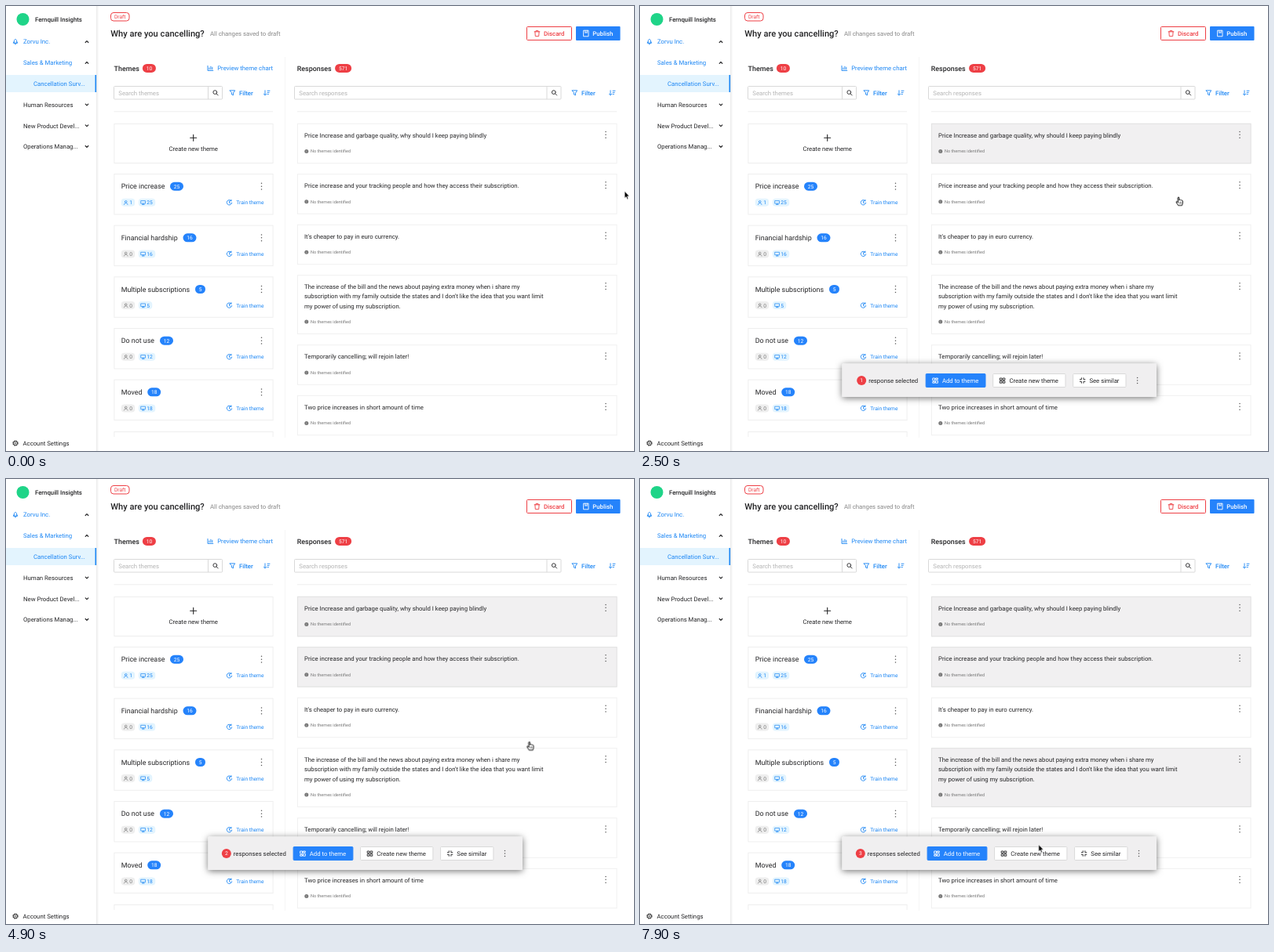
An HTML page that plays this animation: 800x568 px, repeating every 8 s.

```html
<!DOCTYPE html>
<html lang="en">
<head>
<meta charset="utf-8">
<title>Survey responses</title>
<style>
html, body { margin: 0; width: 100%; height: 100%; overflow: hidden; background: #fff; }
svg { display: block; width: 800px; height: 568px; font-family: Roboto, sans-serif; text-rendering: geometricPrecision; }
.anim { animation: 8s linear infinite; }
#cursor { animation-name: travel; }
#arrow { animation-name: arrow; animation-timing-function: step-end; }
#hand { animation-name: hand; animation-timing-function: step-end; }
#hover0 { animation-name: hover0; }
#hover1 { animation-name: hover1; }
#hover3 { animation-name: hover3; }
#picked0 { animation-name: picked0; }
#picked1 { animation-name: picked1; }
#picked3 { animation-name: picked3; }
#popup { animation-name: popup; animation-timing-function: step-end; }
#single { animation-name: single; animation-timing-function: step-end; }
#plural { animation-name: plural; animation-timing-function: step-end; }
#two { animation-name: two; animation-timing-function: step-end; }
#three { animation-name: three; animation-timing-function: step-end; }
@keyframes travel {
  0%, 1.25% { transform: translate(788px, 236.5px); animation-timing-function: ease-in-out; }
  12.5%, 21.25% { transform: translate(661.7px, 188.5px); animation-timing-function: ease-in-out; }
  26.25%, 56.25% { transform: translate(686px, 243.7px); animation-timing-function: ease-in-out; }
  65%, 92.5% { transform: translate(655px, 390.5px); animation-timing-function: ease-in-out; }
  98.7%, 100% { transform: translate(507.7px, 466.7px); }
}
@keyframes arrow { 0% { opacity: 1 } 4% { opacity: 0 } 96.8%, 100% { opacity: 1 } }
@keyframes hand { 0% { opacity: 0 } 4% { opacity: 1 } 96.8%, 100% { opacity: 0 } }
@keyframes hover0 { 0%, 7.5% { opacity: 0 } 11%, 20% { opacity: 1 } 22.5%, 100% { opacity: 0 } }
@keyframes hover1 { 0%, 48.75% { opacity: 0 } 52%, 55% { opacity: 1 } 58.75%, 100% { opacity: 0 } }
@keyframes hover3 { 0%, 62% { opacity: 0 } 65%, 85% { opacity: 1 } 88.75%, 100% { opacity: 0 } }
@keyframes picked0 { 0%, 20% { opacity: 0 } 22.5%, 100% { opacity: 1 } }
@keyframes picked1 { 0%, 55% { opacity: 0 } 58.75%, 100% { opacity: 1 } }
@keyframes picked3 { 0%, 85% { opacity: 0 } 88.75%, 100% { opacity: 1 } }
@keyframes popup { 0% { opacity: 0 } 31.2%, 100% { opacity: 1 } }
@keyframes single { 0% { opacity: 1 } 56.2%, 100% { opacity: 0 } }
@keyframes plural { 0% { opacity: 0 } 56.2%, 100% { opacity: 1 } }
@keyframes two { 0% { opacity: 1 } 92.4%, 100% { opacity: 0 } }
@keyframes three { 0% { opacity: 0 } 92.4%, 100% { opacity: 1 } }
</style>
</head>
<body>
<svg id="stage" viewBox="0 0 800 568">
  <defs>
    <filter id="shadow" x="-10%" y="-60%" width="120%" height="220%">
      <feDropShadow dx="0" dy="1.5" stdDeviation="4" flood-color="#000" flood-opacity=".55"/>
    </filter>
    <clipPath id="list"><rect x="130" y="140" width="220" height="410"/></clipPath>
  </defs>
</svg>
<script>
const INK = '#242426', BLUE = '#1b86f4', FILL = '#2583fb', RED = '#ee3f45', MUTED = '#868686', PALE = '#e3f4fe';
const BODY = 7.78, SMALL = 6.67, TINY = 5.56, TITLE = 8.89;

// Text is placed by the vertical centre of its capitals.
const text = (x, cy, str, { size = BODY, fill = INK, weight = 400, anchor = 'start' } = {}) =>
  `<text x="${x}" y="${cy + size * 0.36}" font-size="${size}" fill="${fill}" font-weight="${weight}" text-anchor="${anchor}">${str}</text>`;
const rect = (x, y, w, h, fill = 'none', stroke = 'none', r = 0) =>
  `<rect x="${x}" y="${y}" width="${w}" height="${h}" rx="${r}" fill="${fill}" stroke="${stroke}"/>`;
const line = (d, stroke, width = 1) =>
  `<path d="${d}" fill="none" stroke="${stroke}" stroke-width="${width}"/>`;
const icon = (x, y, d, color, width = 0.9, fill = 'none') =>
  `<path transform="translate(${x} ${y})" d="${d}" fill="${fill}" stroke="${color}" stroke-width="${width}" stroke-linejoin="round" stroke-linecap="round"/>`;
const anim = (id, content) => `<g id="${id}" class="anim">${content}</g>`;
const dots = (x, y, gap = 3.9) =>
  [-gap, 0, gap].map(d => `<circle cx="${x}" cy="${y + d}" r=".75" fill="#555"/>`).join('');
const pill = (cx, cy, w, str, fill) =>
  rect(cx - w / 2, cy - 5.5, w, 11, fill, 'none', 5.5) +
  text(cx, cy, str, { size: SMALL, fill: '#fff', anchor: 'middle' });

const ICON = {
  chart: 'M-3.3-3V3H3.5M-1.4 1.4V-.5M.6 1.4V-2.2M2.5 1.4V-1.2',
  funnel: 'M-3.2-3H3.2L1 .2V3L-1 2.2V.2Z',
  sort: 'M-2-3V3M-3.6 1.4L-2 3L-.4 1.4M1-2.6H4M1-.4H3.2M1 1.8H2.4',
  search: 'M1.7-.7A2.4 2.4 0 1 1-3.1-.7A2.4 2.4 0 1 1 1.7-.7M1.1 1.1L3.2 3.2',
  trash: 'M-3.4-2.2H3.4M-1.3-2.2V-3.6H1.3V-2.2M-2.6-2.2L-2.2 3.6H2.2L2.6-2.2',
  sheet: 'M-3-3.8H3V3.8H-3ZM-1.2-3.6V-.6L0-1.4L1.2-.6V-3.6',
  clock: 'M2.4-2.2A3.2 3.2 0 1 0 3.2.4M0-1.7V.3L1.5 1.1M2.5-3.4V-2H1.1',
  person: 'M-1.3-1A1.3 1.3 0 1 1 1.3-1A1.3 1.3 0 1 1-1.3-1M-2.3 2.6C-2 0 2 0 2.3 2.6',
  screen: 'M-2.7-2.2H2.7V1.3H-2.7ZM0 1.3V2.5M-1.4 2.6H1.4',
  drop: 'M-1.7 1.2V-1C-1.7-2.5-.6-3.5 0-3.9C.6-3.5 1.7-2.5 1.7-1V1.2ZM-1.7-.6L-2.9 1.2H2.9L1.7-.6M-.7 2.8H.7',
  grid: 'M-3-3H-.6V-.6H-3ZM.8-3H3.2V-.6H.8ZM-3 .8H-.6V3.2H-3ZM.8.8H3.2V3.2H.8Z',
  addGrid: 'M-3-3H-.6V0H-3ZM.8-3H3.2V-1.4H.8ZM-3 1.5H-.6V3.2H-3ZM.8.2H3.2V3.2H.8Z',
  compress: 'M-3.3-1.3H-1.3V-3.3M3.3-1.3H1.3V-3.3M-3.3 1.3H-1.3V3.3M3.3 1.3H1.3V3.3'
};

function sidebar() {
  const caret = (y, up) => icon(103, y, up ? 'M-1.8.9L0-.9L1.8.9' : 'M-1.8-.9L0 .9L1.8-.9', INK, 1.2);
  const groups = [[126, 'Human Resources'], [152.8, 'New Product Devel...'], [179.4, 'Operations Manag...']];
  return rect(115, 0, 1, 568, '#ececec') + rect(116, 0, 1.5, 568, '#f4f4f4') +
    '<circle cx="21.5" cy="17" r="8" fill="#1fd488"/>' +
    text(37, 17, 'Fernquill Insights', { weight: 500 }) +
    icon(12, 46, ICON.drop, BLUE, 0.8) + text(22, 45.6, 'Zorvu Inc.', { fill: BLUE }) + caret(45.6, true) +
    text(22, 72.4, 'Sales &amp; Marketing', { fill: BLUE }) + caret(72.4, true) +
    rect(0, 88, 115, 22, PALE) + rect(113.5, 88, 1.6, 22, BLUE) +
    text(35, 99.2, 'Cancellation Surv...', { fill: BLUE }) +
    groups.map(([y, name]) => text(22, y, name) + caret(y)).join('') +
    '<circle cx="12" cy="558" r="3" fill="none" stroke="#333" stroke-width="1.3" stroke-dasharray="1.6 .76"/>' +
    '<circle cx="12" cy="558" r="2.5" fill="none" stroke="#333" stroke-width=".7"/><circle cx="12" cy="558" r="1" fill="none" stroke="#333" stroke-width=".6"/>' +
    text(21.5, 558, 'Account Settings');
}

function header() {
  return rect(133.5, 8.5, 23.5, 10.5, '#fff', RED, 3.5) + text(145.2, 13.9, 'Draft', { size: SMALL, fill: RED, anchor: 'middle' }) +
    text(133.3, 35, 'Why are you cancelling?', { size: 11.11, weight: 500 }) +
    text(260, 35, 'All changes saved to draft', { fill: MUTED }) +
    rect(663.5, 26.5, 57, 17, '#fff', RED, 1) + icon(676.5, 35, ICON.trash, RED) +
    text(685, 35, 'Discard', { fill: RED, weight: 500 }) +
    rect(726, 26, 56.5, 18, FILL, 'none', 1) + icon(739, 35, ICON.sheet, '#fff') +
    text(747.3, 35, 'Publish', { fill: '#fff', weight: 500 });
}

function toolbar(x, width, label, filterX) {
  const right = x + width, split = right - 18;
  return rect(x, 102.5, width, 16.5, '#fff', '#d9d9d9', 1) + line(`M${split} 102.5V119`, '#d9d9d9') +
    text(x + 5.8, 110.8, label, { fill: '#b4b4b4' }) + icon(right - 8.5, 110.8, ICON.search, INK) +
    icon(filterX, 110.8, ICON.funnel, BLUE) + text(filterX + 8.4, 110.8, 'Filter', { fill: BLUE, weight: 500 }) +
    icon(filterX + 43.5 + (x > 300 ? 4 : 0), 110.8, ICON.sort, BLUE);
}

function themes() {
  const items = [['Price increase', 25, 217.5, 1], ['Financial hardship', 16, 234, 0], ['Multiple subscriptions', 5, 247.5, 0],
    ['Do not use', 12, 204.5, 0], ['Moved', 18, 188.7, 0]];
  const tag = (x, cy, w, name, n, on) => rect(x, cy - 5, w, 10, on ? PALE : '#eee', 'none', 4) +
    icon(x + 6, cy, ICON[name], on ? BLUE : '#777', 0.7) +
    text(x + 10.5, cy, n, { size: SMALL, fill: on ? BLUE : '#777' });
  const cards = items.map(([name, n, badgeX, people], i) => {
    const top = 214.5 + i * 65.65;
    return rect(137.9, top, 202.2, 51.5, '#fff', '#eee') +
      text(146.7, top + 15.7, name, { size: TITLE }) +
      pill(badgeX, top + 15.7, n > 9 ? 17 : 13, n, FILL) + dots(325.5, top + 15.7) +
      tag(146.7, top + 36.3, 17.5, 'person', people, people) +
      tag(168.8, top + 36.3, n > 9 ? 21.5 : 17.5, 'screen', n, true) +
      icon(284.5, top + 36.3, ICON.clock, BLUE) +
      text(293.3, top + 36.3, 'Train theme', { size: SMALL, fill: BLUE });
  }).join('');
  return text(137.6, 79.3, 'Themes', { size: TITLE, weight: 500 }) + pill(182.4, 79.4, 17, 10, RED) +
    icon(260.3, 79.4, ICON.chart, BLUE) + text(340, 79.4, 'Preview theme chart', { fill: BLUE, anchor: 'end' }) +
    toolbar(137.5, 138, 'Search themes', 288.5) + line('M137.5 134.8H340', '#ededed') +
    '<g clip-path="url(#list)">' + rect(137.9, 150.5, 202.2, 50, '#fff', '#eee') +
    icon(238.7, 168.3, 'M-4 0H4M0-4V4', INK, 1.1) + text(238.7, 182.5, 'Create new theme', { anchor: 'middle' }) +
    cards + rect(137.9, 543.5, 202.2, 51, '#fff', '#eee') + '</g>';
}

function responses() {
  const items = [
    [150.3, 50.5, 'Price Increase and garbage quality, why should I keep paying blindly'],
    [214.7, 50.5, 'Price increase and your tracking people and how they access their subscription.'],
    [279.2, 50.5, "It's cheaper to pay in euro currency."],
    [343.7, 74.7, 'The increase of the bill and the news about paying extra money when i share my',
      "subscription with my family outside the states and I don't like the idea that you want limit",
      'my power of using my subscription.'],
    [432.8, 50.5, 'Temporarily cancelling; will rejoin later!'],
    [497.3, 50.5, 'Two price increases in short amount of time']
  ];
  const cards = items.map(([top, h, ...lines], i) => {
    const note = top + h - 15.4;
    const active = [0, 1, 3].includes(i);
    return rect(371.5, top, 406.5, h, '#fff', '#f0f0f0') +
      (active ? anim('picked' + i, rect(371.5, top, 406.5, h, '#f1f0f1', '#e2e2e2')) +
        anim('hover' + i, rect(370.7, top - 0.6, 408, h + 1.4, 'none', '#d9f0fb', 1) + rect(371.2, top, 407.2, h + 0.5, 'none', '#9ad3ef', 1)) : '') +
      lines.map((str, n) => text(380, top + 14.7 + n * 12.22, str)).join('') +
      dots(764, top + 14) + `<circle cx="382.8" cy="${note}" r="2.5" fill="#777"/>` +
      line(`M382.8 ${note - 0.2}V${note + 1.3}M382.8 ${note - 1.3}V${note - 0.7}`, '#ddd', 0.5) +
      text(388, note, 'No themes identified', { size: TINY, fill: '#777' });
  }).join('');
  return line('M355.5 65V551', '#f5f5f5') +
    text(370.8, 79.3, 'Responses', { size: TITLE, weight: 500 }) + pill(429.6, 79.4, 21, 571, RED) +
    toolbar(367.5, 339.5, 'Search responses', 724.5) + line('M371 134.8H778', '#ededed') + cards;
}

function popup() {
  const button = (x, w, name, label, main) =>
    rect(x + 0.5, 469.5, w - 1, 17, main ? FILL : '#fff', main ? FILL : '#d9d9d9', 1) +
    icon(x + 12.5, 478, ICON[name], main ? '#fff' : INK) +
    text(x + 21.2, 478, label, { fill: main ? '#fff' : INK });
  const badge = (x, n) => text(x, 478, n, { size: SMALL, fill: '#fff', anchor: 'middle' });
  const row = (x, label, shift, digits) =>
    `<circle cx="${x}" cy="478" r="6" fill="${RED}"/>` + digits + text(x + 9, 478, label) +
    button(363.7 + shift, 76.8, 'addGrid', 'Add to theme', true) +
    button(449.2 + shift, 93.3, 'grid', 'Create new theme') +
    button(551.2 + shift, 68.3, 'compress', 'See similar') + dots(633.6 + shift, 478, 3.6);
  return anim('popup',
    `<g filter="url(#shadow)">${rect(257.5, 456.5, 400.5, 42.5, '#f0eff0', 'none', 1.5)}</g>` +
    anim('single', row(282.2, 'response selected', 0, badge(282.2, 1))) +
    anim('plural', row(280.8, 'responses selected', 1.9, anim('two', badge(280.8, 2)) + anim('three', badge(280.8, 3)))));
}

function cursor() {
  const arrow = 'M0 0V8.8L2-.0L2 7L3.4 10.2L4.9 9.5L3.5 6.4H6.2Z'.replace('L2-.0L2 7', 'L2 7');
  const hand = 'M-.8 .7Q0-.5 .8.7V4.2L1 3.4Q2 3 2.5 4Q3.5 3.4 4 4.4Q5.2 4 5.4 5.2V7.6Q5.2 9 4.5 10.8H-.4Q-1.4 9-2.8 7Q-3.4 5.8-2.3 5.6Q-1.4 5.7-.8 6.8Z';
  return anim('cursor',
    anim('arrow', icon(0, 0, arrow, '#fff', 0.7, '#000')) +
    anim('hand', icon(0, 0, hand, '#111', 1, '#fff') + line('M1 8.7V6.2M2.4 8.7V6.2M3.8 8.7V6.2', '#111', 0.5)));
}

document.getElementById('stage').innerHTML += sidebar() + header() + themes() + responses() + popup() + cursor();
</script>
</body>
</html>
```
